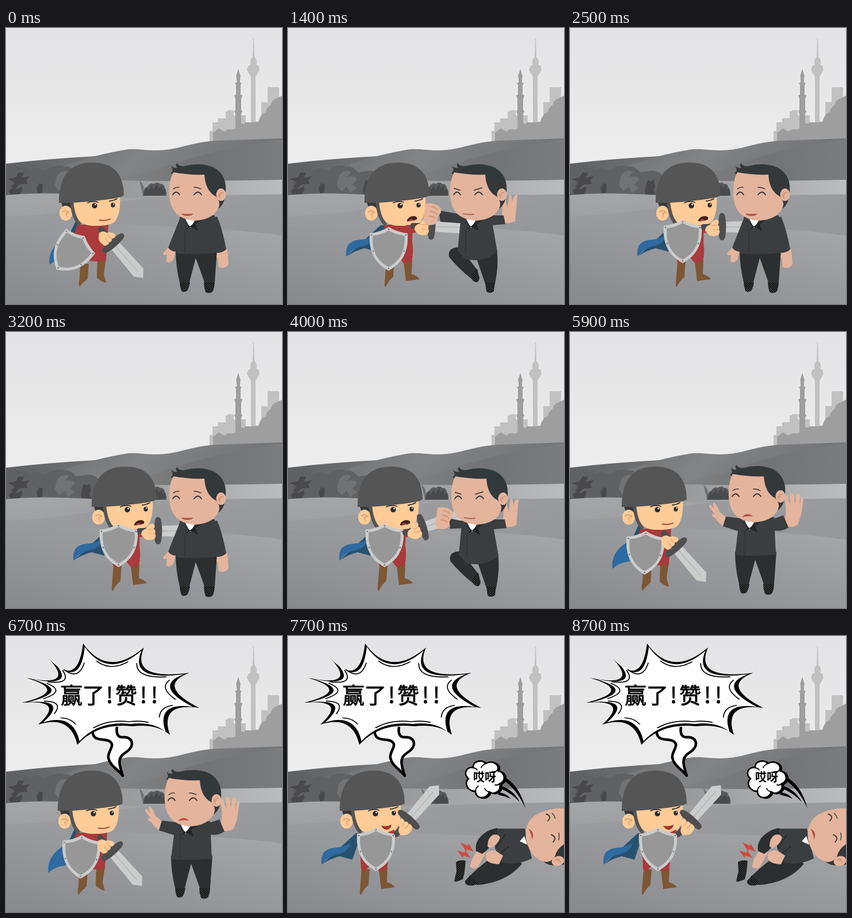
These frames come from a looping animation (480 by 480 pixels, 8900 ms). An HTML page:

```html
<!DOCTYPE html>
<html lang="zh">
<head>
<meta charset="utf-8">
<style>
html, body { margin: 0; width: 100%; height: 100%; overflow: hidden; }
svg { display: block; width: 100vw; height: 100vh; }
text { font-family: "Noto Sans CJK SC", "Noto Sans CJK", sans-serif; }
.line { fill: none; stroke: #333; stroke-width: 1.8; stroke-linecap: round; }
.skin { fill: #ffcb97; }
.tan { fill: #e4b49c; }
.jacket { fill: #3a3e40; }
.pants { fill: #2c2f2f; }
.shoe { fill: url(#dots); }
.boot { fill: #7d5634; }
.red { fill: #aa3a3b; }
.crease { fill: none; stroke: #c98d70; stroke-width: 1.3; stroke-linecap: round; }
</style>
</head>
<body>
<svg viewBox="0 0 480 480">
<defs>
  <linearGradient id="sky" x2="0" y2="1"><stop stop-color="#e3e3e5"/><stop offset="1" stop-color="#f0f0f0"/></linearGradient>
  <linearGradient id="hillBack"><stop stop-color="#5f6062"/><stop offset="1" stop-color="#7c7d7f"/></linearGradient>
  <linearGradient id="hillMid" x2="1" y2=".3"><stop stop-color="#6f7072"/><stop offset=".4" stop-color="#828385"/><stop offset="1" stop-color="#707173"/></linearGradient>
  <linearGradient id="hillFront"><stop stop-color="#858688"/><stop offset=".6" stop-color="#727375"/><stop offset="1" stop-color="#7b7c7e"/></linearGradient>
  <linearGradient id="far"><stop offset=".3" stop-color="#929395"/><stop offset="1" stop-color="#bbbcbe"/></linearGradient>
  <linearGradient id="field" x2=".2" y2="1"><stop stop-color="#a5a6a8"/><stop offset="1" stop-color="#8b8c90"/></linearGradient>
  <linearGradient id="near" x1="1" x2="0" y2="1"><stop stop-color="#a6a7a9"/><stop offset="1" stop-color="#88898d"/></linearGradient>
  <pattern id="dots" width="4" height="4" patternUnits="userSpaceOnUse"><path fill="#1d1f1f" d="M0 0h4v4h-4z"/><path fill="#555" d="M0 0h1v1h-1zM2 2h1v1h-1z"/></pattern>
  <path id="burst" d="M134 13Q177 74 240 20Q215 78 319 64Q260 86 336 125Q266 115 285 172Q262 152 220 157Q160 150 124 189Q112 136 56 154Q105 110 28 116Q112 95 35 73Q122 90 74 39Q125 92 134 13Z"/>
  <clipPath id="oval"><ellipse cx="180" cy="102" rx="116" ry="60"/></clipPath>
  <path id="plate" d="M0 0Q-14 9 -33 11C-35 45 -23 63 0 76C23 63 35 45 33 11Q14 9 0 0Z"/>
</defs>

<g id="scene">
  <path fill="url(#sky)" d="M0 0h480v300H0z"/>
  <path fill="#c1c1c1" d="M354 200v-21h5v-15h10v-7h13v-12h4v-2h10v9h21v15h9V85L419 73l3-8h3v-9l4-6L430 18h1l1 32 4 6v9h3l2 8-7 12v80h10v-36h11v-26h20v97z"/>
  <path fill="#9e9e9e" d="M360 200v-18l6-4q4-6 8-1l6 3q6-6 13-3l6-2v-25l-2-6 2-1v-20l-2-6 3-1V99l-2-3 3-1v-8l-1-3 4-13 4 13-1 3v8l3 1-2 3v17l3 1-2 6v20l2 1-2 6v16l6 1v-3h13l11-1q3-13 13-17 1-7 8-12 2-10 14-13l8-5v80z"/>
  <path fill="url(#hillBack)" d="M0 236Q75 227 155 223L240 300H0z"/>
  <path fill="url(#hillMid)" d="M98 240Q160 219 212 211C240 209 257 218 300 208Q340 197 365 196L480 192V300H150z"/>
  <path fill="url(#hillFront)" d="M150 266Q220 260 270 244Q345 214 480 193V300H150z"/>
  <path fill="url(#far)" d="M0 290L160 264Q270 267 350 266L480 264V310H0z"/>
  <path fill="#606163" d="M0 238q20-2 38 6l6 3 10-4 14 5q15-12 32-8 14 0 22 11l22-3q18 2 23 20l3 24H0z"/>
  <path fill="#717274" d="M88 258q9-14 22-8l-8 9q14-4 18 5l-9 9 9 5-12 9-6-11-9 8-8-10z"/>
  <path fill="#49494b" d="M3 262l14-2 5-9 10 1-5 8 15-2-7 7 3 6-14 1-8 7-8-3 7-7zM5 282l7-4 8 2 7-5 2 6-6 9H7zM53 278l5-8 6 2-1 14-7 2zM130 282l5-18 6 3 4-4 3 12-3 7 5 9h-18z"/>
  <path fill="#707173" d="M232 265q6 5 8 13l-2 12z"/>
  <path fill="#5a5b5d" d="M238 292q0-14 8-16 4-8 11-5 6-5 11 0 7-1 8 7 4 6 3 14z"/>
  <path fill="#48494b" d="M240 291q0-10 7-14l-1 8 8-12 2 9 7-11 2 9 6-7 1 9 5-3 1 11z"/>
  <path fill="url(#field)" d="M0 291C50 285 120 289 165 291Q230 300 310 292L480 289V480H0z"/>
  <path fill="#97989b" d="M0 328Q110 323 180 306T480 290V372Q240 334 0 345z" opacity=".6"/>
  <path fill="url(#near)" d="M0 345Q130 337 250 344Q390 348 480 361V480H0z"/>
</g>

<g id="knight">
  <g data-for="idle rest">
    <path fill="#27526f" d="M121 336l10 7-14 18-9 3z"/>
    <path fill="#2f6aa0" d="M110 362C88 370 72 390 76 412Q86 401 106 399z"/>
    <path class="boot" d="M129 410h15l-2 26q-8 6-14 14-3-5 0-14zM159 402h15l-4 26 4 15q-9-2-16-9z"/>
    <path class="red" d="M124 342h54l-4 62q-16 4-32 0l-24-44z"/>
  </g>
  <g data-for="low thrust cut high win">
    <path fill="#27526f" d="M120 343h10l-16 46-22-6q-16 4-31 14z"/>
    <path fill="#2f6aa0" d="M111 360C90 373 75 363 63 378Q58 390 61 398Q70 382 94 378Q106 374 111 360z"/>
    <path class="boot" d="M130 406h14l-2 27q-8 6-13 17-3-1-2-7zM160 406l15-3-1 25q10 3 14 9l-24 3z"/>
    <path class="red" d="M126 342h50l-1 30q3 18-1 33l-13 5-12-15-15 15-5-5z"/>
  </g>
  <path fill="#38383a" d="M95 300h20v15l-15 1z"/>
  <ellipse class="skin" cx="104" cy="322" rx="11" ry="13"/>
  <path d="M98 320q8-5 12 2m-2-1q-6 1-2 8" fill="none" stroke="#d89a6c" stroke-width="1.5"/>
  <path class="skin" d="M116 298L198 292Q200 322 190 336Q182 344 158 344Q135 345 126 334Q117 322 116 298z"/>
  <path fill="none" stroke="#555" stroke-width="6" d="M114 299Q116 330 129 342"/>
  <path fill="#555" d="M92 304C92 256 112 234 151 234C190 234 205 258 205 291Q200 295 184 297Q130 305 92 304z"/>
  <g fill="#2b2b2d"><circle cx="154" cy="309" r="4.7"/><ellipse cx="186" cy="308" rx="3.7" ry="4"/></g>
  <g fill="#fff"><circle cx="155.500" cy="307" r="1.300"/><circle cx="187" cy="306.500" r="1.100"/></g>
  <path class="line" d="M142 304q9-4 18-1M180 301q8-1 13-4"/>
  <path data-for="idle rest" fill="none" stroke="#a33b30" stroke-width="1.8" d="M162 334q12 2 20-2"/>
  <g data-for="low thrust cut high">
    <path fill="#45201c" d="M166 334q4-7 12-7 7 1 5 6-8 4-17 3z"/><path fill="#c84f45" d="M168 335q5-4 10-1-5 2-10 1z"/>
  </g>
  <path data-for="win" fill="#a33228" d="M164 330q11 2 18-2-1 8-8 9-6 0-10-7z"/>
  <path id="arm" fill="none" stroke="#aa3a3b" stroke-width="14"/>
  <g id="shield">
    <use href="#plate" fill="#cbcccc"/>
    <use href="#plate" fill="#979797" transform="translate(0 6) scale(.84)"/>
    <g fill="#777"><circle cy="4" r="1.300"/><circle cx="-30" cy="14" r="1.300"/><circle cx="30" cy="14" r="1.300"/><circle cx="-27" cy="42" r="1.300"/><circle cx="27" cy="42" r="1.300"/><circle cy="72" r="1.300"/></g>
  </g>
  <g id="sword">
    <path fill="#cbcccc" d="M3-9L68-11L80 0L68 11L3 9z"/>
    <path fill="none" stroke="#b4b5b5" stroke-width="1.500" d="M4 0H66"/>
    <rect x="-36" y="-5" width="36" height="10" rx="4" fill="#4b4b4d"/>
    <path fill="#4e4e50" d="M-3-23Q4-27 6-17Q9 0 6 17Q4 26-3 22Q-7 16-5 0Q-7-16-3-23z"/>
    <path class="skin" d="M-9-13Q-3-10-7-4Q-3-1-5 4Q-2 9-6 14Q-15 18-22 14L-29 7Q-29-2-20-4Q-18-11-9-13z"/>
    <path d="M-7-3q-5 2-10 0M-5 5q-6 1-11-1" fill="none" stroke="#d89a6c"/>
  </g>
</g>

<g id="man">
  <g data-for="stand">
    <path class="tan" d="M283 380q-5 7-10 12 1 5 7 2l-1 12q6 4 12-3l4-16zM364 388q-5 8-2 14l6-3 2 17q11 4 17-5l-2-26z"/>
  </g>
  <g data-for="stand alarm">
    <path class="pants" d="M295 386h72l-4 56h-18l-15-42-11 42h-17q-7-28-7-56z"/>
    <path class="shoe" d="M302 442h18q-1 9-5 15-6 4-10 0-3-8-3-15zM344 442h19q0 9-4 17-7 4-12 0-3-8-3-17z"/>
    <path class="jacket" d="M303 326h60l3 65q-36 4-71 1z"/>
  </g>
  <path data-for="stand" class="jacket" d="M304 327L282 382q5 7 14 7l14-40zM357 330l10-2q9 20 16 57-6 6-17 6z"/>
  <g data-for="guard punch">
    <path class="tan" d="M372 338q4-20 2-35l6-4 4 13 3-22q5 0 5 13 3-15 9-12l-4 45q-14 6-25 2z"/>
    <path class="pants" d="M306 382Q279 379 282 398Q300 420 322 437L332 422L316 401L331 404L345 445h17Q369 410 365 385z"/>
    <path class="shoe" d="M320 428l11-9 4 16q-1 8-7 7-8-3-8-14zM345 443h17l-2 15q-7 5-13 0z"/>
    <path class="jacket" d="M303 326h74l3 15-22 2 8 46q-24 20-56 13L297 387z"/>
  </g>
  <path data-for="guard" class="jacket" d="M310 330L280 324l2 18 26-1z"/>
  <path data-for="punch" class="jacket" d="M312 326L264 317l3 20 42 3z"/>
  <g data-for="alarm">
    <path class="tan" d="M281 327L268 317Q262 300 257 301Q255 304 260 312L253 305Q249 304 251 310L260 321L255 320Q254 325 261 328Q266 337 276 342zM382 329Q386 308 379 289q4-4 7 1l5 14-1-18q4-5 7 0l2 17 3-17q5-3 6 2l-1 18 3-14q4-2 4 3l-4 27-6 17q-9 6-21 3z"/>
    <path class="jacket" d="M312 329L279 325l-5 17 32 10zM356 331l23-8 9 21q-12 8-26 5z"/>
  </g>
  <g data-for="stand guard punch alarm">
    <path fill="#fff" d="M312 332h18l-10 16z"/>
    <path fill="#232627" d="M307 333l10 12-5 6 9-5 13 7-4-12 12-8-8 1-14 11z"/>
    <path d="M311 350v42" stroke="#2c2f2f"/>
  </g>
  <g data-for="fallen">
    <path class="pants" d="M374 373Q345 389 314 419L329 433Q380 429 407 396z"/>
    <path class="shoe" d="M317 416l15 15-11 3q-14 1-13-8zM292 393q8-5 17-2l-2 20-3 12q-10 5-15 4 2-10 4-18z"/>
    <path class="tan" d="M330 372Q317 390 317 401Q323 408 331 401L344 376z"/>
    <path class="jacket" d="M359 335H412L424 387Q396 400 372 394L360 369z"/>
    <path class="pants" d="M364 334Q346 336 332 352Q325 362 327 374L338 379Q350 370 364 352z"/>
    <path class="tan" d="M344 378q6-7 18-4l12 8-7 15q-20-1-23-10zM347 366q0-15 9-20 10-3 13 5-5 14-18 18z"/>
    <path d="M377 346l-15 22M384 366l-14 12" class="line" style="stroke:#25292a"/>
    <path fill="#fff" d="M411 348l-8 9 13 6z"/>
  </g>
  <g id="head">
    <path fill="#33383a" d="M286 252Q293 249 287 240Q293 245 298 243Q294 239 297 235Q302 242 311 240Q338 233 362 243Q385 257 382 286Q381 305 370 314z"/>
    <path class="tan" d="M291 251Q318 256 345 255Q347 284 365 293Q374 303 370 312Q360 334 327 335Q286 332 284 291Q283 265 291 251z"/>
    <ellipse class="tan" cx="374" cy="290" rx="8.500" ry="11"/>
    <path class="crease" d="M369 292q4-8 9-5m-4 2q-4 3-2 7"/>
    <path class="line" d="M290 290q6-9 12 0M327 290q7-9 13 0"/>
    <path class="line" style="stroke-width:1.300" data-for="stand alarm fallen" d="M291 280q5-4 10-3M327 277q7 0 12 3"/>
    <path class="line" data-for="guard punch" d="M291 279l10 3M326 282l13-4"/>
    <path data-for="stand" fill="#b9584b" d="M305 323h21q-3 4-10 4-9 0-11-4z"/>
    <path data-for="guard punch" fill="none" stroke="#9b5c48" stroke-width="1.600" d="M306 323q10 2 20 1"/>
    <path data-for="alarm fallen" fill="#b94b42" d="M307 326q9-10 20-1-8-2-20 1z"/>
  </g>
  <g id="fist" data-for="guard punch">
    <path class="tan" d="M260 306q9-4 21 2 8 5 6 13l-6 8v9q-8 7-20 4-6-6-4-14 2-14 3-22z"/>
    <path class="crease" d="M270 311q7 0 11 5M268 319q8 0 12 5M266 327q7 0 11 4"/>
  </g>
</g>

<path data-for="bolts" fill="#cf4b3e" d="M300 359l13 6 1-4 9 14-12-4-1 4zM294 373l13 4 1-4 10 13-13-4-1 4z"/>

<g data-for="cheer">
  <path fill="#fff" stroke="#000" stroke-width="4.500" stroke-linejoin="round" d="M151 160C148 184 165 178 178 182C193 189 176 200 178 212C181 226 195 232 203 243C196 222 194 212 206 204C228 190 218 175 205 176C195 177 191 171 193 158"/>
  <use href="#burst"/>
  <use href="#burst" fill="#fff" transform="translate(12.500 7) scale(.93)"/>
  <g clip-path="url(#oval)"><use href="#burst" fill="none" stroke="#000" stroke-width="2" transform="translate(25 14) scale(.86)"/></g>
  <text y="117" font-size="38" stroke="#000" stroke-width=".8"><tspan x="95">赢了</tspan><tspan x="174">!</tspan><tspan x="190">赞</tspan><tspan x="233">!</tspan><tspan x="252">!</tspan></text>
</g>
<g data-for="ouch">
  <path d="M374 244Q402 258 413 300Q397 264 372 249zM374 262Q394 270 403 289Q390 274 371 266zM368 272Q380 274 387 283Q376 278 365 276z"/>
  <path id="cloud" stroke="#000" stroke-width="2.500" d="M322 229C321 217 338 214 344 222C356 215 369 224 364 234C378 237 380 252 368 257C372 270 358 277 350 271C346 285 326 284 326 270C312 270 306 256 314 248C304 240 310 227 322 229Z"/>
  <use href="#cloud" fill="#000" x="3" y="1"/>
  <path fill="#fff" stroke="#000" stroke-width="2.500" d="M322 229C321 217 338 214 344 222C356 215 369 224 364 234C378 237 380 252 368 257C372 270 358 277 350 271C346 285 326 284 326 270C312 270 306 256 314 248C304 240 310 227 322 229Z"/>
  <path class="line" style="stroke:#000" d="M344 222q-6 2-8 7M364 234q-4 3-9 2M368 257q-3 3-8 2M350 271q-6-1-8-6M326 270q0-6 5-9M322 229q5 1 7 4"/>
  <text x="322" y="253" font-size="20" font-weight="700">哎呀</text>
</g>
</svg>

<script>
const LOOP = 8900;
const $ = id => document.getElementById(id);
const parts = [...document.querySelectorAll('[data-for]')]
  .map(el => ({ el, states: el.dataset.for.split(' ') }));

// shield: x, y, angle; sword: x, y, angle; arm: path
const stances = {
  idle:   { shield: [137, 362, 40], sword: [186, 374, 49], arm: 'M154 350L172 368' },
  rest:   { shield: [134, 346, 2], sword: [186, 374, 49], arm: 'M154 350L172 368' },
  low:    { shield: [134, 346, 0], sword: [208, 345, 2], arm: 'M164 350L181 349' },
  thrust: { shield: [139, 333, 0], sword: [207, 346, 0], arm: 'M164 351L181 349' },
  cut:    { shield: [139, 333, 0], sword: [205, 340, -17], arm: 'M164 353L180 349' },
  high:   { shield: [139, 333, 0], sword: [216, 273, -75], arm: 'M168 352L210 292' },
  win:    { shield: [155, 333, 0], sword: [212, 320, -49], arm: 'M165 354L189 343' },
};
const manShift = { stand: [0, 0], guard: [0, 0], punch: [-2, 0], alarm: [-8, -4], fallen: [0, 0] };

// time, knight stance, knight x, man pose, extras
const steps = [
  [0, 'idle', 0, 'stand'], [200, 'idle', 10, 'stand'], [400, 'high', 29, 'stand'],
  [600, 'cut', 29, 'guard'], [800, 'thrust', 57, 'stand'], [1000, 'high', 41, 'guard'],
  [1200, 'low', 41, 'punch'], [1600, 'high', 41, 'guard'], [1800, 'cut', 29, 'guard'],
  [2000, 'high', 29, 'stand'], [2200, 'cut', 41, 'stand'], [2400, 'thrust', 57, 'stand'],
  [2600, 'low', 41, 'punch'], [2800, 'cut', 29, 'guard'], [3000, 'high', 41, 'punch'],
  [3200, 'thrust', 57, 'stand'], [3400, 'cut', 29, 'guard'], [3600, 'low', 41, 'punch'],
  [3800, 'cut', 29, 'guard'], [4200, 'thrust', 57, 'stand'], [4400, 'low', 41, 'punch'],
  [4600, 'cut', 29, 'guard'], [5200, 'low', 41, 'punch'], [5400, 'thrust', 57, 'stand'],
  [5600, 'cut', 29, 'guard'], [5900, 'rest', -2, 'alarm'], [6100, 'rest', -2, 'alarm', 'cheer'],
  [7100, 'win', -2, 'alarm', 'cheer'], [7300, 'win', -2, 'fallen', 'cheer'],
  [7500, 'win', -2, 'fallen', 'cheer ouch bolts'], [8300, 'rest', -2, 'fallen', 'cheer ouch'],
  [8500, 'win', -2, 'fallen', 'cheer ouch bolts'],
];

const place = (id, x, y, angle = 0) =>
  $(id).setAttribute('transform', `translate(${x} ${y}) rotate(${angle})`);

function show([, stance, x, pose, extras = '']) {
  const on = [stance, pose, ...extras.split(' ')];
  for (const { el, states } of parts) {
    el.style.display = states.some(s => on.includes(s)) ? '' : 'none';
  }
  const { shield, sword, arm } = stances[stance];
  place('knight', x, 0);
  place('shield', ...shield);
  place('sword', ...sword);
  $('arm').setAttribute('d', arm);
  place('man', ...manShift[pose]);
  place('fist', pose === 'punch' ? -19 : 0, 0);
  $('head').setAttribute('transform', pose === 'fallen'
    ? 'translate(457 333) rotate(76) translate(-314.5 -288)' : '');
}

let current;
function frame() {
  const t = performance.now() % LOOP;
  const step = steps.findLast(s => s[0] <= t);
  if (step !== current) show(current = step);
  requestAnimationFrame(frame);
}
frame();
</script>
</body>
</html>
```
